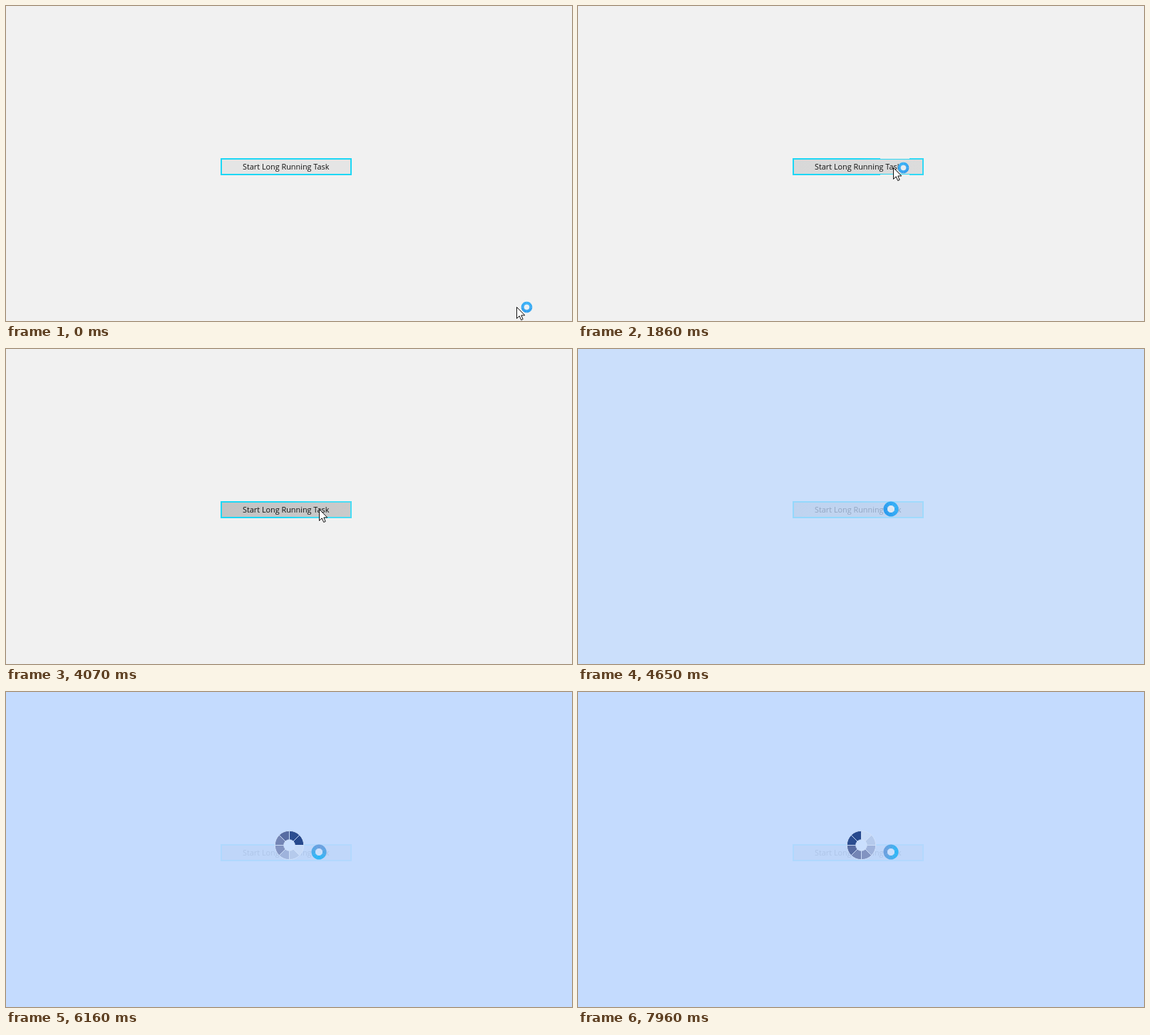
Recreate the animation shown at these times as an HTML page. Size 794x443 px, loop 8000 ms.

```html
<!DOCTYPE html>
<html lang="en">
<head>
<meta charset="utf-8">
<title>Long running task</title>
<style>
html, body { margin: 0; width: 100%; height: 100%; overflow: hidden; background: #f1f1f1; }
svg { display: block; width: 794px; height: 443px; }
text { font: 10.85px "Open Sans", "Noto Sans", sans-serif; }
</style>
</head>
<body>
<svg id="stage" viewBox="0 0 794 443">
  <defs>
    <linearGradient id="face">
      <stop id="faceLeft" offset="0"/>
      <stop id="faceRight" offset="1"/>
    </linearGradient>
    <linearGradient id="edge">
      <stop offset=".5" stop-color="#1dd7f5"/>
      <stop id="edgeRight" offset=".75"/>
    </linearGradient>
  </defs>
  <rect width="794" height="443" fill="#f1f1f1"/>
  <rect x="302" y="215" width="182" height="22" fill="url(#face)" stroke="url(#edge)" stroke-width="2"/>
  <path id="fade" d="M424 214.5h41M424 237.5h41" stroke="#e9eeee"/>
  <text x="332" y="230" fill="#111">Start Long Running Task</text>
  <path id="arrow" d="M.5 .5V16.5L4.2 12.9L6.7 18.6L9.2 17.5L6.8 12H11.8Z" fill="#fff" stroke="#111"/>
  <rect id="veil" width="794" height="443" fill="#bfd9ff"/>
  <g id="spinner" transform="translate(397.5 215.5)">
    <circle r="8.5" fill="#cadffe"/>
  </g>
  <g id="ring"><circle id="hole"/></g>
</svg>
<script>
const LOOP = 8000, TICK = 68.4, SEGMENTS = 8, ARCS = 16;
const byId = id => document.getElementById(id);
const set = (el, attrs) => { for (const k in attrs) el.setAttribute(k, attrs[k]); };
const show = (el, on) => set(el, { visibility: on ? "visible" : "hidden" });
const clamp = v => Math.max(0, Math.min(1, v));
const span = (t, a, b) => clamp((t - a) / (b - a));
const mix = (a, b, p) => a + (b - a) * p;
const gray = v => `rgb(${v},${v},${v})`;
const blend = (a, b, p) => `rgb(${a.map((v, i) => Math.round(mix(v, b[i], p)))})`;
const tick = (t, start) => Math.floor((t - start + 12) / TICK);

function addPath(parent, attrs) {
  const el = document.createElementNS("http://www.w3.org/2000/svg", "path");
  set(el, attrs);
  parent.appendChild(el);
  return el;
}

// Angles run clockwise from the top, in degrees
function polar(r, deg) {
  const a = deg * Math.PI / 180;
  return `${(r * Math.sin(a)).toFixed(2)} ${(-r * Math.cos(a)).toFixed(2)}`;
}
const arcPath = (r, a, b) => `M${polar(r, a)}A${r} ${r} 0 0 1 ${polar(r, b)}`;
const wedgePath = (inner, outer, a, b) =>
  `${arcPath(outer, a, b)}L${polar(inner, b)}A${inner} ${inner} 0 0 0 ${polar(inner, a)}Z`;

const arrow = byId("arrow"), ring = byId("ring"), hole = byId("hole");
const spinner = byId("spinner"), veil = byId("veil"), fade = byId("fade");
const shades = ["#27498d", "#2b4d90", "#586ca2", "#7485b5", "#8293c1", "#9fb3dc", "#b5caec", "#c8dbf8"];

const wedges = Array.from({ length: SEGMENTS }, (_, i) =>
  addPath(spinner, { d: wedgePath(7.8, 20.2, i * 45, i * 45 + 45), stroke: "#d2e2fb", "stroke-width": .9 }));
const arcs = Array.from({ length: ARCS }, () => addPath(ring, { fill: "none" }));

// time, x, y of the pointer tip
const route = [
  [0, 716, 423], [69, 716, 423], [70, 726, 414], [200, 750, 391], [340, 743, 394],
  [709, 743, 394], [900, 698, 369], [1200, 591, 310], [1510, 493, 256],
  [1700, 462, 238], [1850, 442, 227], [2000, 439, 225], [LOOP, 439, 225]
];

function pointerAt(t) {
  const i = route.findIndex(p => p[0] > t);
  const a = route[i - 1], b = route[i], p = (t - a[0]) / (b[0] - a[0]);
  return [Math.round(mix(a[1], b[1], p)), Math.round(mix(a[2], b[2], p))];
}

function drawRing(x, y, mid, width, turn, depth) {
  set(ring, { transform: `translate(${x} ${y})` });
  set(hole, { r: mid, fill: depth > .5 ? "#cfe2fc" : "#e8f0f6", opacity: .8 });
  arcs.forEach((arc, i) => {
    const a = i * 360 / ARCS;
    const wave = (1 + Math.cos((a - turn) * Math.PI / 180)) / 2;
    const tint = blend([108, 160, 222], [48, 182, 246], wave);
    set(arc, {
      d: arcPath(mid, a - .8, a + 360 / ARCS + .8),
      stroke: depth > .5 ? tint : blend([43, 156, 238], [52, 175, 247], wave),
      "stroke-width": width
    });
  });
}

function drawButton(t) {
  const hover = span(t, 1780, 1950), press = t >= 4070 ? 1 : 0;
  set(byId("faceLeft"), { "stop-color": gray(Math.round(mix(229, press ? 195 : 201, hover))) });
  set(byId("faceRight"), { "stop-color": gray(Math.round(mix(229, press ? 202 : 210, hover))) });
  set(byId("edgeRight"), { "stop-color": blend([29, 215, 245], [72, 220, 244], hover) });
  show(fade, t >= 1780 && t < 2060);
}

function draw(t) {
  const moving = t >= 710 && t < 2650;
  const [x, y] = pointerAt(moving ? 710 + tick(t, 710) * TICK : t);
  const n = Math.max(0, tick(t, 4800));
  const veiled = t >= 4650, loading = t >= 4800;

  drawButton(t);
  set(arrow, { transform: `translate(${x} ${y})` });
  show(arrow, !veiled);
  show(veil, veiled);
  set(veil, { opacity: mix(.74, .9, span(t, 4790, 5010)) });

  show(ring, t < 4070 || veiled);
  if (veiled) drawRing(439, 225, 7.8, 5.4, n * 24 + 60, loading ? 1 : 0);
  else drawRing(x + 14.5, y + .5, 5.8, 4, Math.min(t, 2650) * .36, 0);

  show(spinner, loading);
  set(spinner, { opacity: mix(.5, 1, span(t, 4800, 5010)) });
  const head = Math.floor(n * .84 + .9);
  wedges.forEach((w, i) => set(w, { fill: shades[(head - i + SEGMENTS * 100) % SEGMENTS] }));
}

const begin = performance.now();
function loop() {
  draw((performance.now() - begin) % LOOP);
  requestAnimationFrame(loop);
}
loop();
</script>
</body>
</html>
```
